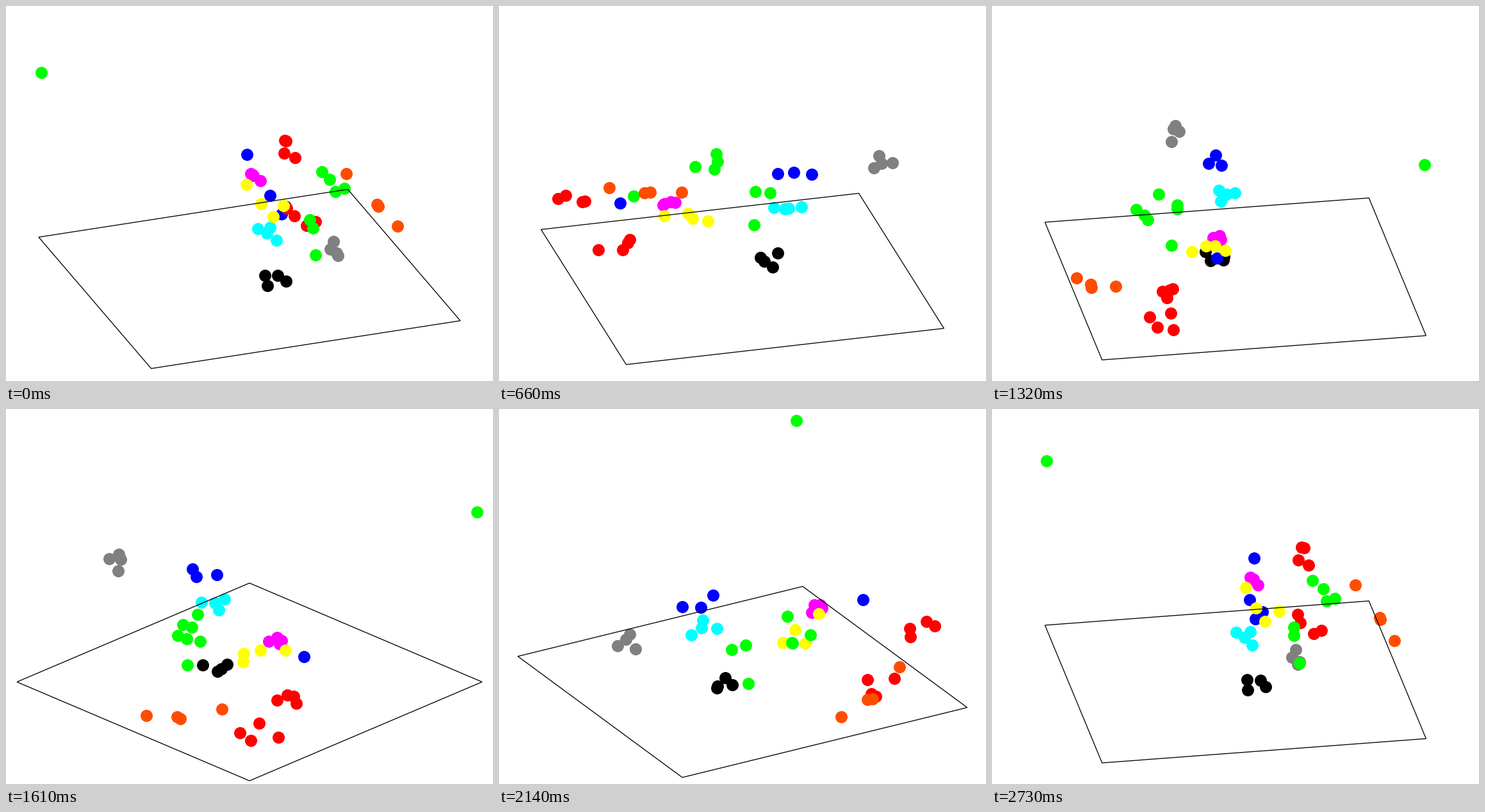
Recreate the animation shown at these times as a matplotlib script. Size 760 by 586 pixels, loop 2800 ms.

```python
import numpy as np
import matplotlib.pyplot as plt
from matplotlib.animation import FuncAnimation

W, H, DPI = 760, 586, 64
PT = 72 / DPI                 # points per pixel
CX, CY = 380, 426.5           # middle of the floor on screen
TILT = 0.4256                 # sine of the camera elevation
RADIUS = 363                  # floor centre to corner
LOOP, STEP = 2800, 20

# Each point: across, depth, and screen height of its orbit centre.
CLUSTERS = {
    "#808080": [(131, -202.3, 281.9), (125.5, -206.8, 292),
                (136, -193.4, 303.5), (138, -222.8, 295.2)],
    "#000000": [(23.5, -32, 407.4), (44, -23.8, 410.9),
                (27.5, -44.3, 418), (57, -50.2, 408.8)],
    "#00ffff": [(12.5, -65.1, 320.3), (31.5, -46, 326.4),
                (27, -69.9, 325.3), (42, -88.2, 328.5)],
    "#ff00ff": [(5.2, 112.8, 312.5), (2.1, 122.8, 314),
                (6.3, 124.7, 318), (17, 106.8, 318.4)],
    "#0000ff": [(-4, 191.4, 313.5), (32, -52.4, 273.7),
                (50, -104, 280.7), (56, -75.4, 281.3)],
    "#ff0000": [(55, 281.9, 330), (57, 294.1, 336.5),
                (54, 255.7, 338.8), (71, 253.2, 344.8),
                (58, 230.9, 413.8), (70, 185.8, 407),
                (89, 195.5, 426.2), (103, 185.7, 416)],
    "#ffff00": [(-5, 122, 330.9), (18, 79.9, 343),
                (53, 90, 350.3), (37, 57.4, 353.4)],
    "#00ff00": [(-325, 142.6, 164.7), (113, 51, 280.7),
                (124.5, 85.2, 307.3), (134, 55.9, 313.8),
                (148, 52.1, 307.2), (94, -11.8, 329),
                (98.5, -34.5, 332.3), (103, -9, 385.2)],
    "#ff4d00": [(151, 222, 356.5), (198.7, 171, 382.6),
                (200.8, 162.1, 382.1), (231, 115.5, 393.2)],
}

# The view turns in uneven jumps, always to a multiple of five degrees.
TURN_TIMES = np.concatenate([
    [0], np.linspace(60, 330, 4), [390, 460, 530, 590, 660],
    np.linspace(740, 1050, 5), [1110], np.linspace(1190, 1610, 7),
    [1680], np.linspace(1740, 2140, 7), [2210, 2260],
    np.linspace(2390, 2730, 6)])
KEY_TIMES = [0, 60, 330, 660, 1050, 1610, 2140, 2730]
KEY_ANGLES = [0, 10, 40, 85, 130, 205, 280, 350]
ANGLES = 5 * np.round(np.interp(TURN_TIMES, KEY_TIMES, KEY_ANGLES) / 5)


def project(points, degrees):
    """Turn points about the vertical axis and map them to the screen."""
    x, y, base = points.T
    a = np.radians(degrees)
    across = x * np.cos(a) - y * np.sin(a)
    depth = x * np.sin(a) + y * np.cos(a)
    return CX + across, base - TILT * depth


corner = np.radians(65 + 90 * np.arange(4))
floor = np.column_stack([RADIUS * np.cos(corner), RADIUS * np.sin(corner),
                         np.full(4, CY)])

fig = plt.figure(figsize=(W / DPI, H / DPI), dpi=DPI, facecolor="white")
ax = fig.add_axes([0, 0, 1, 1])
ax.set_xlim(0, W)
ax.set_ylim(H, 0)
ax.axis("off")

dots = []
for order, (color, points) in enumerate(CLUSTERS.items()):
    line, = ax.plot([], [], "o", color=color, ms=19 * PT, mew=0,
                    zorder=2 + order)
    dots.append((line, np.array(points)))
outline = plt.Polygon(np.zeros((4, 2)), fill=False, ec="black",
                      lw=1.3 * PT, zorder=20)
ax.add_patch(outline)


def draw(k):
    t = k * STEP + STEP / 2
    angle = ANGLES[np.searchsorted(TURN_TIMES, t, side="right") - 1]
    for line, points in dots:
        line.set_data(*project(points, angle))
    outline.set_xy(np.column_stack(project(floor, angle)))
    return [line for line, _ in dots] + [outline]


anim = FuncAnimation(fig, draw, frames=LOOP // STEP, interval=STEP,
                     repeat=True, repeat_delay=0, blit=False)
plt.show()
```
